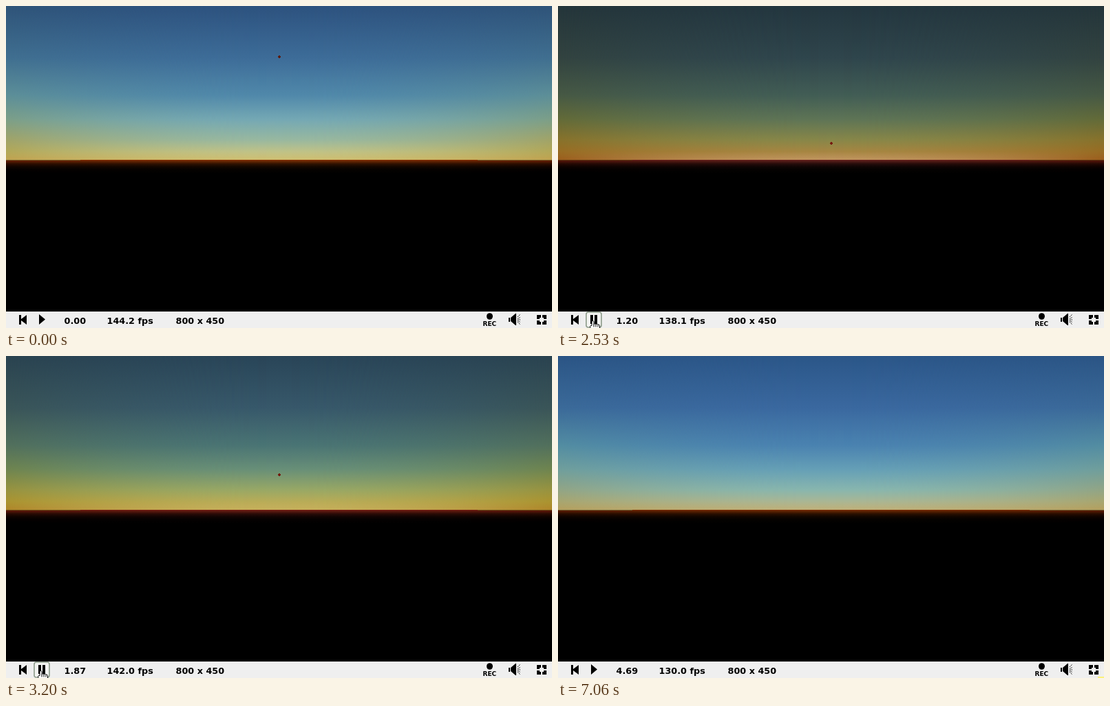
Animation, 793 px wide and 469 px high, one loop 7130 ms. Source, as an HTML page with a canvas:

```html
<!DOCTYPE html>
<html lang="en">
<head>
<meta charset="utf-8">
<title>Sunset player</title>
<style>
html, body { margin: 0; width: 100%; height: 100%; overflow: hidden; background: #000; }
#stage { position: relative; width: 793px; height: 469px; overflow: hidden; background: #000; }
#stage > * { position: absolute; left: 0; top: 0; }
text { font: bold 12.8px "DejaVu Sans", Verdana, sans-serif; fill: #000; }
text.rec { font-size: 9px; }
</style>
</head>
<body>
<div id="stage">
  <canvas id="sky" width="793" height="445"></canvas>
  <svg width="793" height="469" viewBox="0 0 793 469">
    <path id="sun" d="M-1-2H1V-1H2V1H1V2H-1V1H-2V-1H-1Z"/>
    <rect y="445" width="793" height="24" fill="#efefef"/>
    <rect id="hover" x="41" y="446" width="22" height="22" rx="3" fill="#f4f5f2" stroke="#8b9a88" stroke-width="1.6"/>
    <path d="M19 450h3v6l8-6v14l-8-6v6h-3z"/>
    <path id="play" d="M48 449v15l9-7.5z"/>
    <path id="pause" d="M47 450h4v13h-4zM53 450h4v13h-4z"/>
    <text id="time" x="84.500" y="463">0.00</text>
    <text id="fps" x="146.500" y="463" textLength="">144.2 fps</text>
    <text x="246.500" y="463">800 x 450</text>
    <ellipse cx="702.500" cy="452" rx="4.500" ry="4.800"/>
    <text class="rec" x="692.500" y="466">REC</text>
    <path d="M730 454h2v6h-2zM733 454l7-6h1v17h-1l-7-6z"/>
    <path d="M743 453l4-4M743 457h5M743 460l4 4M743 455.500l4-2M743 458.500l4 2" fill="none" stroke="#000" stroke-dasharray="1.500 1"/>
    <path d="M771 450h6v4h-2v2h-4zM785 450h-6v4h2v2h4zM771 464h6v-4h-2v-2h-4zM785 464h-6v-4h2v-2h4z"/>
    <rect id="corner" x="784" y="467" width="9" height="2" fill="#fbf17a"/>
    <path id="arrow" d="M.5.5v16l3.700-3.500 2.500 5.700 2.500-1-2.500-5.700h5z" fill="#fff" stroke="#000"/>
    <path id="hand" d="M-1.500 7.500V1.500q1.500-2 3 0v4q1.500-1.500 3 0 1.500-1 3 .500 2-.500 2.500 1.500v5l-2 5h-7l-4.500-7q-1.500-3 2-3zM1.500 5.500v4M4.500 6v3.500M7.500 6.500v3" fill="#fff" stroke="#000"/>
  </svg>
</div>
<script>
const $ = id => document.getElementById(id);
const W = 793, H = 445, LOOP = 7130, STEP = 66.6;

// Sun height above the horizon, then colours from zenith to ground: centre column, outer column
const ROWS = [0, 75, 130, 165, 195, 212, 224.5];
const SKIES = [
  [5, "1a2019 24291f 353a26 4e4c24 6e561e 8a4e20 b87068 4a2426", "1a1f18 25281c 363620 514415 6f400c 7c3010 7e2008 481008"],
  [52, "294558 37586a 4a7474 688f78 98a866 b8ac58 c8b05c 681c12", "2a4350 3a5558 52705c 6f854f 98933f ab9430 b0862a 601808"],
  [86, "2b4f6f 3c6582 4e7f8e 709f92 9cb47c bdbf72 cabf72 74260a", "2c4e69 3f6572 5b8277 7a9262 a09c4c b3a244 bd9a3e 661c04"],
  [150, "2d527f 3d6c98 5088aa 74a8b4 98b8a0 bfc288 d0bf70 762c02", "2f5479 406f90 5d8f98 7c9f88 a1a468 b3a858 c2a350 681f00"],
  [278, "2c5589 3b69a0 4b85b2 68a4b8 8bbaac b0be94 c6b87c 702a00", "2c5585 3c6c99 5590a2 74a49a 96a880 aeab6c bca45c 621e00"],
  [349, "2b5688 3a689f 4a82b0 659fb6 88b6ae aab694 c0b078 6a2700", "2b5585 3b6a99 538da2 709f9c 92a585 a8a670 b5a05e 5e1c00"]
].map(([h, ...cols]) => ({
  k: Math.log(h + 10),
  cols: cols.map(c => c.split(" ").map(x => [0, 2, 4].map(i => parseInt(x.substr(i, 2), 16))))
}));

const lerp = (a, b, u) => a + (b - a) * u;
const clamp = u => Math.min(1, Math.max(0, u));
const css = (c, m = 1) => `rgb(${c.map(v => Math.round(v * m))})`;

// Piecewise linear value through [x, y] points
function track(points, x) {
  let i = 0;
  while (i < points.length - 2 && x > points[i + 1][0]) i++;
  const [a, b] = [points[i], points[i + 1]];
  return lerp(a[1], b[1], (x - a[0]) / (b[0] - a[0]));
}

const SUN = [[0, 151], [.6, 86], [1.4, 5], [1.87, 52], [2.68, 137], [4.69, 349]];
const RATES = [[0, 144.2], [.4, 143.9], [1.05, 138.1], [1.6, 142], [2.3, 134.3], [3.1, 132.4], [3.7, 130.2], [4.4, 130]];

const ctx = $("sky").getContext("2d");
const layer = document.createElement("canvas");
layer.width = W;
layer.height = H;
const mid = layer.getContext("2d");

const mask = mid.createLinearGradient(0, 0, W, 0);
for (let i = 0; i <= 16; i++) {
  const u = i / 8 - 1;
  mask.addColorStop(i / 16, `rgba(0,0,0,${1 - u * u})`);
}

function paintColumn(c, cols, edge) {
  const g = c.createLinearGradient(0, 0, 0, H);
  ROWS.forEach((y, i) => g.addColorStop(y / H, css(cols[i])));
  const glow = [[edge, 1], [227.5, .72], [230, .4], [234, .16], [238, .05], [244, 0]];
  g.addColorStop(edge / H, css(cols[6]));
  for (const [y, m] of glow) g.addColorStop(y / H, css(cols[7], m));
  c.fillStyle = g;
  c.fillRect(0, 0, W, H);
}

function paintSky(height) {
  const k = Math.log(height + 10);
  let i = 0;
  while (i < SKIES.length - 2 && k > SKIES[i + 1].k) i++;
  const [a, b] = [SKIES[i], SKIES[i + 1]];
  const u = clamp((k - a.k) / (b.k - a.k));
  const [centre, outer] = a.cols.map((col, n) =>
    col.map((c, r) => c.map((v, j) => lerp(v, b.cols[n][r][j], u))));

  paintColumn(ctx, outer, 225);
  mid.globalCompositeOperation = "source-over";
  paintColumn(mid, centre, 225);
  mid.globalCompositeOperation = "destination-in";
  mid.fillStyle = mask;
  mid.fillRect(0, 0, W, H);
  ctx.drawImage(layer, 0, 0);

  // The horizon bulges by one pixel in the middle
  ctx.fillStyle = css(centre[7], 1.1);
  ctx.fillRect(108, 224, 577, 1);
  ctx.fillStyle = css(outer[6], .6);
  ctx.fillRect(0, 224, 108, 1);
  ctx.fillRect(685, 224, 108, 1);
}

function cursorAt(n) {
  if (n < 0 || n > 98) return null;
  if (n <= 10) return [lerp(516, 82, n / 10), lerp(461, 447, n / 10)];
  if (n <= 92) {
    const u = clamp((n - 10) / 3);
    return [lerp(82, 50.5, u), lerp(447, 458, u)];
  }
  const u = (n - 92) / 6;
  return [lerp(50.5, 688, u), lerp(458, 460, u) - 50 * u * (1 - u)];
}

const show = (id, on) => $(id).style.display = on ? "" : "none";
const place = (id, x, y) => $(id).setAttribute("transform", `translate(${x} ${y})`);

function draw(ms) {
  const n = Math.floor((ms - 130) / STEP);
  const s = Math.min(4.69, Math.max(0, .598 + (140 + n * STEP - 1938.2) * .0010069));
  const height = track(SUN, s);
  paintSky(height);
  place("sun", 397, Math.round(225 - height) - .0);
  $("sun").setAttribute("fill", css([lerp(125, 92, clamp(height / 150)), 28, 16]));

  const rate = RATES.filter(r => r[0] <= s).pop()[1];
  $("time").textContent = s.toFixed(2);
  $("fps").textContent = rate.toFixed(1) + " fps";

  const playing = n >= 18 && n < 89;
  const cursor = cursorAt(n);
  const over = !!cursor && cursor[0] < 64;
  show("play", !playing);
  show("pause", playing);
  show("hover", over);
  show("hand", over);
  show("arrow", cursor && !over);
  if (cursor) place(over ? "hand" : "arrow", ...cursor);
  show("corner", ms >= 7055);
}

const start = performance.now();
function tick() {
  draw((performance.now() - start) % LOOP);
  requestAnimationFrame(tick);
}
tick();
</script>
</body>
</html>
```
